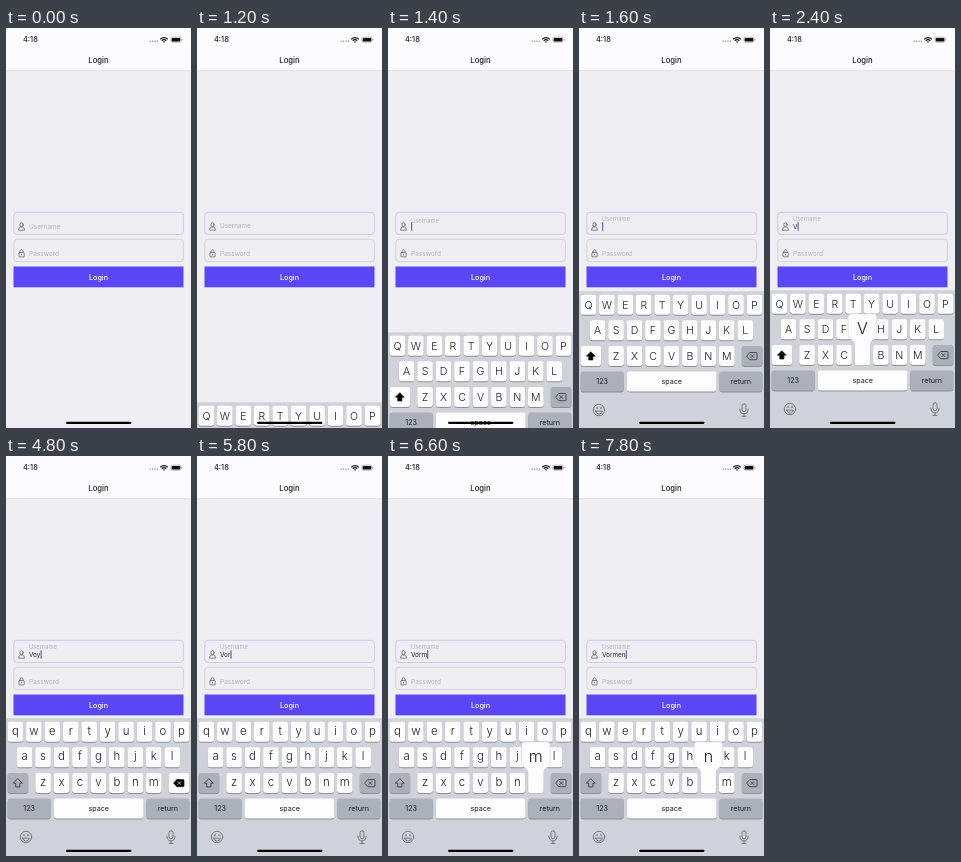
Animation of 185 by 400 pixels, one loop 8 s. Source, as an HTML page:

```html
<!DOCTYPE html>
<html lang="en">
<head>
<meta charset="utf-8">
<title>Login</title>
<style>
  html, body { margin: 0; width: 100%; height: 100%; overflow: hidden; background: #efeef2; }
  svg { display: block; width: 100%; height: 100%; font-family: Inter, Roboto, sans-serif; }
  .mid { text-anchor: middle; }
  .line { fill: none; stroke: #55555c; stroke-width: .7; stroke-linecap: round; stroke-linejoin: round; }
  .hint { fill: #b5b3bb; font-size: 6.5px; }
  .cap { fill: #1c1c1f; font-weight: 300; }
</style>
</head>
<body>
<svg viewBox="0 0 185 400">
  <rect width="185" height="400" fill="#efeef2"/>
  <rect width="185" height="42.5" fill="#fcfbfd"/>
  <rect y="42.5" width="185" height=".6" fill="#d9d8dd"/>

  <text x="17" y="14.3" font-size="7.4" font-weight="500" fill="#222">4:18</text>
  <g fill="#77777c">
    <circle cx="144.2" cy="13.2" r=".65"/><circle cx="146.6" cy="13.2" r=".65"/>
    <circle cx="149" cy="13.2" r=".65"/><circle cx="151.4" cy="13.2" r=".65"/>
  </g>
  <g fill="none" stroke="#111" stroke-width="1.15">
    <path d="M154.2 11.2Q158 7.9 161.8 11.2M155.7 12.7Q158 10.7 160.3 12.7"/>
    <path d="M157.3 13.9h1.4"/>
  </g>
  <rect x="165" y="9.2" width="10" height="5" rx="1.4" fill="none" stroke="#777" stroke-width=".5"/>
  <rect x="165.7" y="9.9" width="8.6" height="3.6" rx=".8" fill="#111"/>
  <rect x="175.6" y="10.9" width=".8" height="1.6" rx=".4" fill="#777"/>
  <text class="mid" x="92.5" y="35.4" font-size="7.7" font-weight="500" fill="#222">Login</text>

  <rect x="7.8" y="184.3" width="169.6" height="22.2" rx="3.2" fill="none" stroke="#c6c1e8" stroke-width=".8"/>
  <rect x="7.8" y="211.3" width="169.6" height="22.4" rx="3.2" fill="none" stroke="#cdcbd8" stroke-width=".8"/>
  <g class="line">
    <ellipse cx="15.5" cy="196.7" rx="1.7" ry="2"/>
    <path d="M12.5 201.8q0-2.3 2-2.8h2q2 .5 2 2.8z"/>
    <rect x="12.9" y="224.6" width="5.3" height="4.3" rx=".7"/>
    <path d="M14 224.6v-1.3a1.55 1.55 0 0 1 3.1 0v1.3M15.5 226.3v.9"/>
  </g>
  <text id="label" class="hint" x="23">Username</text>
  <text class="hint" x="23" y="227.8">Password</text>
  <text id="value" x="23" y="200.9" font-size="6.4" fill="#25252b"></text>
  <rect id="caret" y="194.3" width="1" height="8.4" fill="#414a9c"/>

  <rect x="7.5" y="238.5" width="170" height="20.8" fill="#5a46f5"/>
  <text class="mid" x="92.5" y="251.5" font-size="7.2" font-weight="500" fill="#fff">Login</text>

  <g id="board">
    <rect y="262.3" width="185" height="140" fill="#d0d2d9"/>
    <g id="keys"></g>
    <path id="shiftIcon" d="M11.8 322.7l4.5 4.5h-2.4v3.8h-4.2v-3.8h-2.4z" stroke="#222" stroke-width=".7" stroke-linejoin="round"/>
    <path id="delIcon" d="M167.6 327.1l3.2-3.6h6.3q.9 0 .9.9v5.4q0 .9-.9.9h-6.3z" stroke="#222" stroke-width=".7" stroke-linejoin="round"/>
    <path id="delCross" d="M171.6 325.4l3.4 3.4m0-3.4l-3.4 3.4" stroke-width=".7"/>
    <g fill="none" stroke="#62656c" stroke-width=".8" stroke-linecap="round">
      <circle cx="20" cy="381" r="5.7"/>
      <path d="M16.6 382.2h6.8q-.6 3-3.4 3t-3.4-3z"/>
      <path d="M18 378.6v1M22 378.6v1" stroke-width="1.1"/>
      <rect x="163" y="374.8" width="4" height="8" rx="2"/>
      <path d="M160.9 380.2q0 4.6 4.1 4.6t4.1-4.6M165 384.8v2.6M163 387.4h4"/>
    </g>
    <g id="pop">
      <path d="M-12-31H12Q14.4-31 14.4-28V-11C14.4-5 7.8-6 7.8 0V18Q7.8 20.5 5.3 20.5H-5.3Q-7.8 20.5-7.8 18V0C-7.8-6-14.4-5-14.4-11V-28Q-14.4-31-12-31Z" fill="#fdfdfe" stroke="#b9bbc2" stroke-width=".4"/>
      <text id="popText" class="mid cap" y="-10.6" font-size="16"></text>
    </g>
  </g>
  <rect x="60" y="393.7" width="65.5" height="2.3" rx="1.15" fill="#000"/>
</svg>
<script>
const $ = id => document.getElementById(id);
const NS = 'http://www.w3.org/2000/svg';
const LOOP = 8000, TICK = 200;
const WHITE = '#fdfdfe', GREY = '#abb0ba', PITCH = 18.45;

function add(tag, attrs, text = '') {
  const el = document.createElementNS(NS, tag);
  for (const k in attrs) el.setAttribute(k, attrs[k]);
  el.textContent = text;
  return $('keys').appendChild(el);
}

function key(x, y, w, fill = WHITE) {
  add('rect', { x, y: y + .9, width: w, height: 20, rx: 2.4, fill: '#8c8f96' });
  return add('rect', { x, y, width: w, height: 20, rx: 2.4, fill });
}

const letters = {};
[['qwertyuiop', 9.4, 265.8], ['asdfghjkl', 18.6, 291.3], ['zxcvbnm', 37.1, 317]].forEach(([row, x0, y]) => {
  [...row].forEach((ch, i) => {
    const x = x0 + i * PITCH;
    key(x - 7.8, y, 15.6);
    letters[ch] = { x, y, el: add('text', { class: 'mid cap', x }, ch) };
  });
});
const shiftKey = key(1.6, 317, 20.6, GREY);
const delKey = key(162.8, 317, 20.6, GREY);
[['123', 1.6, 43.2, GREY], ['space', 48, 89.5, WHITE], ['return', 140.4, 43, GREY]].forEach(([name, x, w, fill]) => {
  key(x, 342.6, w, fill);
  add('text', { class: 'mid', x: x + w / 2, y: 354.8, 'font-size': 7.2, fill: '#1c1c1f' }, name);
});

// start, typed text, raised key, delete held
const typing = [
  [0, ''], [2400, 'V', 'v'], [2600, 'V'], [2800, 'Vo'],
  [3600, 'Voy', 'y'], [4000, 'Voy'],
  [4600, 'Voy', '', true], [5000, 'Vo'],
  [5400, 'Vor', 'r'], [5800, 'Vor'],
  [6600, 'Vorm', 'm'], [7000, 'Vorm'], [7200, 'Vorme'], [7800, 'Vormen', 'n']
];
// start, keyboard drop, label baseline, label size
const opening = [
  [0, 140, 200.8, 6.5], [1200, 112, 199.6, 6.3], [1400, 42, 195.2, 5.75], [1600, 1, 193.2, 5.75], [1800, 0, 193.2, 5.75]
];
const blink = [
  [0, 0], [1400, 1], [1800, .5], [2000, 0], [2200, 1], [6000, .5], [6200, 0], [6400, 1]
];
const at = (table, t) => table.findLast(row => row[0] <= t);

function setCase(upper) {
  for (const ch in letters) {
    const { y, el } = letters[ch];
    el.textContent = upper ? ch.toUpperCase() : ch;
    el.setAttribute('y', y + (upper ? 14 : 13));
    el.setAttribute('font-size', upper ? 10.6 : 11.4);
  }
  shiftKey.setAttribute('fill', upper ? WHITE : GREY);
  $('shiftIcon').setAttribute('fill', upper ? '#000' : 'none');
}

function draw(t) {
  const [, drop, labelY, size] = at(opening, t);
  const [, text, raised, held] = at(typing, t);
  const upper = t < 2600;

  $('board').setAttribute('transform', `translate(0 ${drop})`);
  $('label').setAttribute('y', labelY);
  $('label').style.fontSize = size + 'px';
  $('value').textContent = text;
  $('caret').setAttribute('x', 23.2 + (text ? $('value').getComputedTextLength() : 0));
  $('caret').setAttribute('opacity', at(blink, t)[1]);
  setCase(upper);

  delKey.setAttribute('fill', held ? WHITE : GREY);
  $('delIcon').setAttribute('fill', held ? '#000' : 'none');
  $('delCross').setAttribute('stroke', held ? '#fff' : '#222');

  $('pop').setAttribute('visibility', raised ? 'visible' : 'hidden');
  if (raised) {
    const { x, y } = letters[raised];
    $('pop').setAttribute('transform', `translate(${x} ${y})`);
    $('popText').textContent = upper ? raised.toUpperCase() : raised;
  }
}

let last = -1;
function frame() {
  const t = Math.floor(performance.now() % LOOP / TICK) * TICK;
  if (t !== last) draw(last = t);
  requestAnimationFrame(frame);
}
frame();
</script>
</body>
</html>
```
